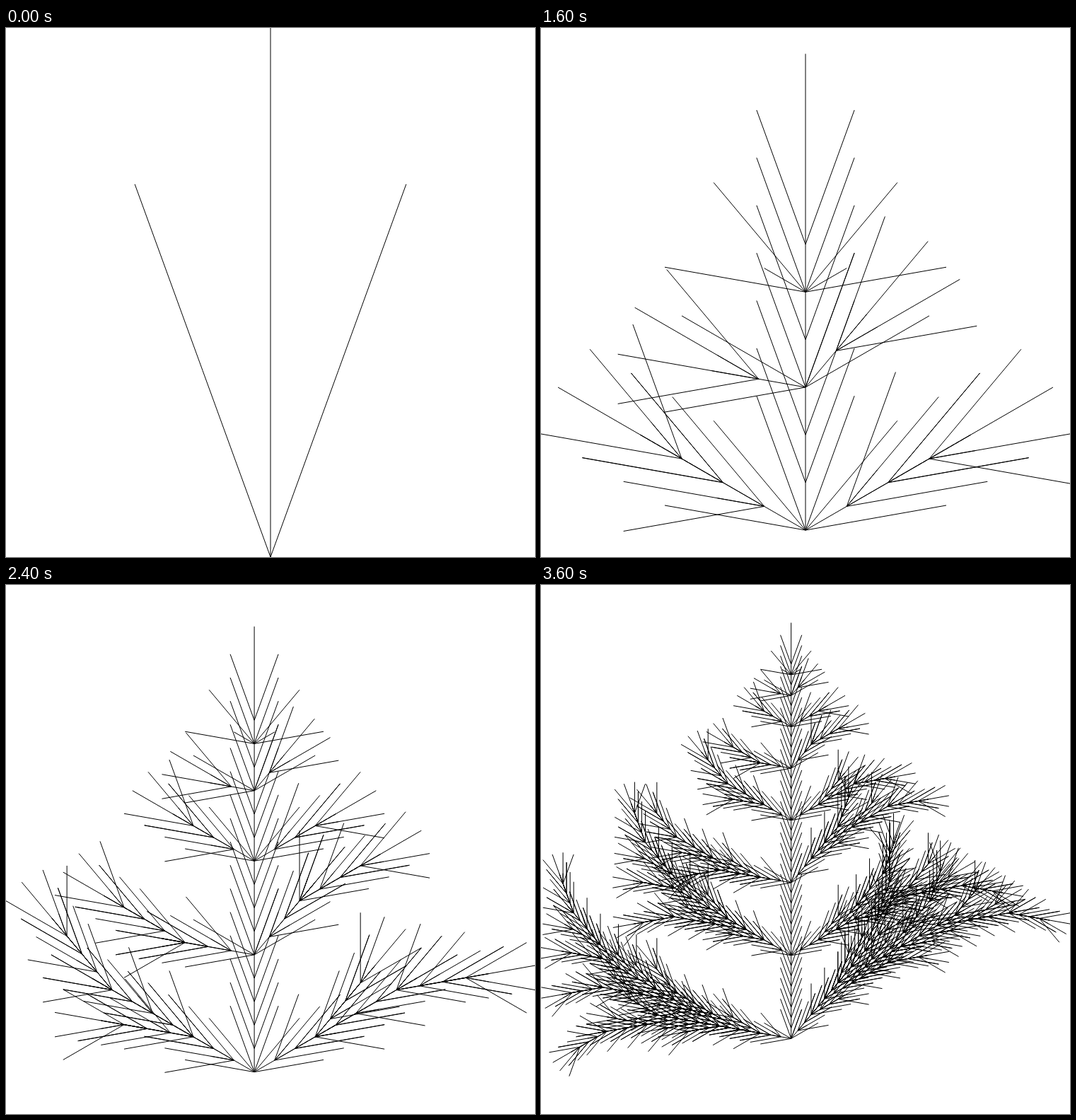
Recreate the animation shown at these times as an HTML page with a canvas. Size 748 px wide and 748 px high, loop 4000 ms.

```html
<!DOCTYPE html>
<html lang="en">
<head>
<meta charset="utf-8">
<title>L-system bush</title>
<style>
  html, body { margin: 0; width: 100%; height: 100%; overflow: hidden; background: #fff; }
  canvas { display: block; }
</style>
</head>
<body>
<canvas id="stage" width="748" height="748"></canvas>
<script>
const SIZE = 748, STEP = 400, LOOP = 4000, TURN = Math.PI / 9;
const AXIOM = 'VZFFF';
const RULES = {
  V: '[+++W][---W]YV',
  W: '+X[-W]Z',
  X: '-W[+X]Z',
  Y: 'YZ',
  Z: '[-FFF][+FFF]F'
};
const ctx = document.getElementById('stage').getContext('2d');

const grow = word => word.replace(/[V-Z]/g, c => RULES[c]);

// Walk the word with a turtle; each straight run becomes one line.
function trace(word) {
  const lines = [], stack = [];
  let x = 0, y = 0, angle = 0, run = 0;

  function flush() {
    if (!run) return;
    const nx = x - run * Math.sin(angle), ny = y - run * Math.cos(angle);
    lines.push([x, y, nx, ny]);
    x = nx;
    y = ny;
    run = 0;
  }

  for (const c of word) {
    if (c === 'F') { run++; continue; }
    flush();
    if (c === '+') angle += TURN;
    else if (c === '-') angle -= TURN;
    else if (c === '[') stack.push([x, y, angle]);
    else if (c === ']') [x, y, angle] = stack.pop();
  }
  flush();
  return lines;
}

// Scale the lines to the stage and centre them.
function fit(lines) {
  let left = 0, right = 0, top = 0, bottom = 0;
  for (const [x1, y1, x2, y2] of lines) {
    left = Math.min(left, x1, x2);
    right = Math.max(right, x1, x2);
    top = Math.min(top, y1, y2);
    bottom = Math.max(bottom, y1, y2);
  }
  const k = SIZE / Math.max(right - left, bottom - top);
  const px = x => SIZE / 2 + (x - (left + right) / 2) * k;
  const py = y => SIZE / 2 + (y - (top + bottom) / 2) * k;
  return lines.map(([x1, y1, x2, y2]) => [px(x1), py(y1), px(x2), py(y2)]);
}

const plants = [];
for (let i = 0, word = AXIOM; i < LOOP / STEP; i++) {
  word = grow(word);
  plants.push(fit(trace(word)));
}

function draw(lines) {
  ctx.fillStyle = '#fff';
  ctx.fillRect(0, 0, SIZE, SIZE);
  ctx.strokeStyle = '#000';
  ctx.lineWidth = 1;
  for (const [x1, y1, x2, y2] of lines) {
    ctx.beginPath();
    ctx.moveTo(x1, y1);
    ctx.lineTo(x2, y2);
    ctx.stroke();
  }
}

let shown = -1;
function render(time) {
  const index = Math.floor((time % LOOP) / STEP);
  if (index === shown) return;
  shown = index;
  draw(plants[index]);
}

const start = performance.now();
function tick() {
  render(performance.now() - start);
  requestAnimationFrame(tick);
}
tick();
</script>
</body>
</html>
```
